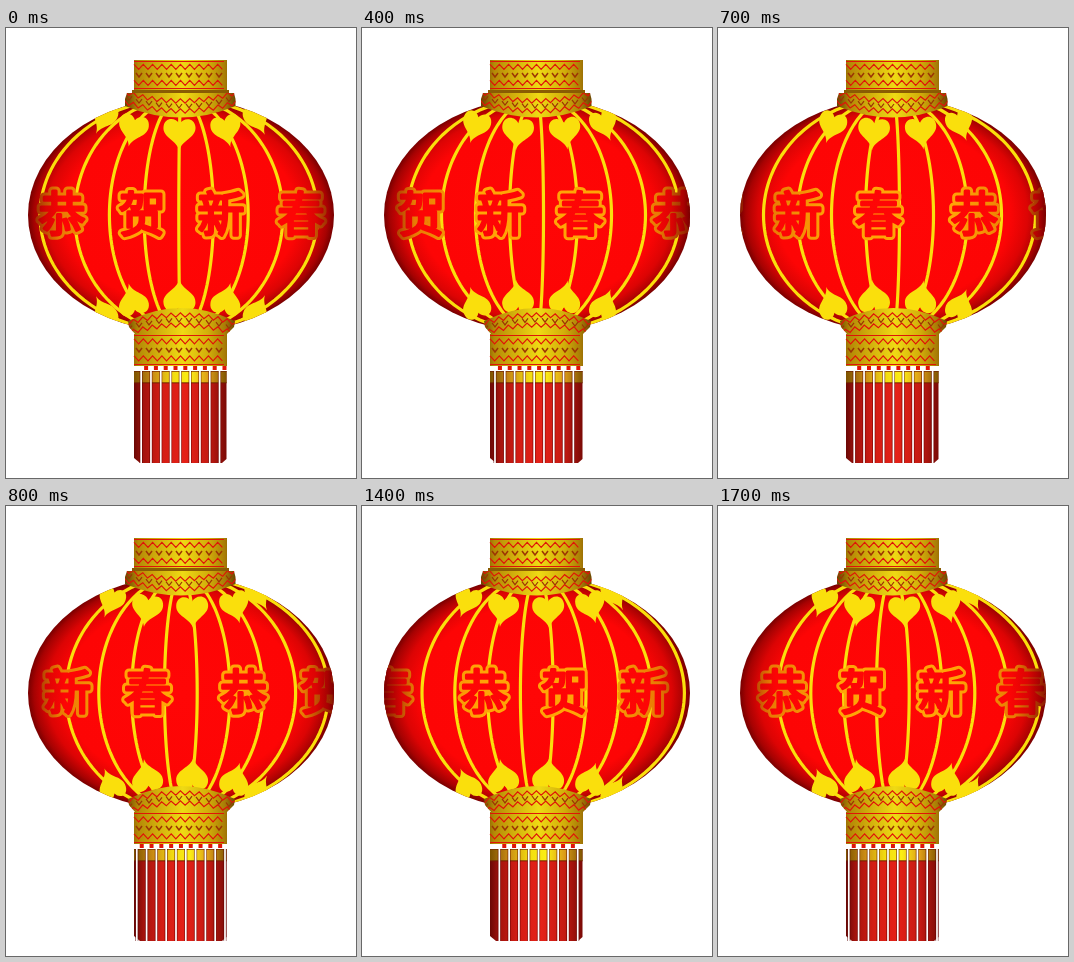
These frames come from a looping animation (350 by 450 pixels, 1.8 s). An HTML page with a canvas:

```html
<!DOCTYPE html>
<html lang="zh-CN">
<head>
<meta charset="utf-8">
<style>
html, body { margin: 0; width: 100%; height: 100%; overflow: hidden; background: #fff; }
canvas { display: block; }
</style>
</head>
<body>
<canvas id="stage" width="350" height="450"></canvas>
<script>
const ctx = document.getElementById('stage').getContext('2d');
const STEP_MS = 100, STEPS = 18;
const CX = 175, CY = 187, RX = 153, RY = 117;
const YELLOW = '#fadf0c', RED = '#e01408';

// Ribs repeat every three steps; every second rib carries hearts.
const RIB_PHASES = [
  { start: 34, gap: 34.7, parity: 0 },
  { start: 45.5, gap: 34, parity: 1 },
  { start: 60, gap: 32.8, parity: 0 }
];
const GLYPHS = [['恭', 0], ['贺', 80], ['新', 159], ['春', 239]];
const TEXT_PERIOD = 335;

function horizontal(x0, x1, stops) {
  const g = ctx.createLinearGradient(x0, 0, x1, 0);
  stops.forEach(([at, color]) => g.addColorStop(at, color));
  return g;
}

const gold = horizontal(119, 230, [[0, '#684400'], [0.12, '#b58a06'], [0.3, '#d2b00c'],
  [0.52, '#efda14'], [0.75, '#d2ae0a'], [0.9, '#a87c06'], [1, '#684400']]);
const tasselRed = horizontal(128, 221, [[0, '#6a0805'], [0.1, '#a3130d'], [0.3, '#d41d14'],
  [0.55, '#e52118'], [0.8, '#c41a12'], [1, '#780a06']]);
const tasselGold = horizontal(128, 221, [[0, '#7c5200'], [0.2, '#c98a14'], [0.42, '#f2dc10'],
  [0.6, '#fbee14'], [0.8, '#dc9c18'], [1, '#7c5200']]);
const glyphLine = horizontal(22, 328, [[0, '#8c1800'], [0.1, '#e87a04'], [0.3, '#ffa406'],
  [0.7, '#ffa406'], [0.9, '#e87a04'], [1, '#8c1800']]);
const shade = [[0, '#ff0606'], [0.76, '#fd0505'], [0.88, '#dc0404'], [0.96, '#a60202'], [1, '#780000']];
const glyphFill = horizontal(22, 328,
  [...shade.map(([at, c]) => [0.5 - at / 2, c]), ...shade.map(([at, c]) => [0.5 + at / 2, c])]);

const ribX = (u, y) => CX + u * RX * Math.sqrt(1 - ((y - CY) / RY) ** 2);

function drawBody() {
  ctx.save();
  ctx.translate(CX, CY);
  ctx.scale(RX, RY);
  const g = ctx.createRadialGradient(0, 0, 0, 0, 0, 1);
  shade.forEach(([at, color]) => g.addColorStop(at, color));
  ctx.fillStyle = g;
  ctx.beginPath();
  ctx.arc(0, 0, 1, 0, 7);
  ctx.fill();
  ctx.restore();
}

function drawHeart(u, flip) {
  const y = 104 - 18 * u * u;
  ctx.save();
  ctx.translate(0, CY);
  ctx.scale(1, flip);
  ctx.translate(ribX(u, y), y - CY);
  ctx.rotate(-u * 0.5);
  ctx.scale(1 - 0.3 * u * u, 1);
  ctx.beginPath();
  ctx.moveTo(0, 19);
  ctx.bezierCurveTo(-2, 8, -17, 6, -16, -5);
  ctx.bezierCurveTo(-15, -15, -4, -15, 0, -8);
  ctx.bezierCurveTo(4, -15, 15, -15, 16, -5);
  ctx.bezierCurveTo(17, 6, 2, 8, 0, 19);
  ctx.fill();
  ctx.restore();
}

function drawRibs(phase) {
  const { start, gap, parity } = RIB_PHASES[phase];
  ctx.strokeStyle = ctx.fillStyle = YELLOW;
  ctx.lineWidth = 3.2;
  for (let i = 0; i < 9; i++) {
    const u = (start + gap * i - CX) / RX;
    if (Math.abs(u) > 0.98) continue;
    ctx.beginPath();
    for (let y = 72; y <= 302; y += 5) ctx.lineTo(ribX(u, y), y);
    ctx.stroke();
    if (i % 2 === parity) {
      drawHeart(u, 1);
      drawHeart(u, -1);
    }
  }
}

function drawGreeting(step) {
  ctx.font = '500 47px "Noto Sans CJK SC", "Noto Sans CJK", sans-serif';
  ctx.textAlign = 'center';
  ctx.textBaseline = 'alphabetic';
  ctx.lineJoin = 'round';
  for (const [glyph, offset] of GLYPHS) {
    for (let turn = 0; turn < 3; turn++) {
      const x = 56 - 19.2 * step + offset + turn * TEXT_PERIOD;
      if (x < -20 || x > 370) continue;
      ctx.strokeStyle = glyphLine;
      ctx.lineWidth = 9;
      ctx.strokeText(glyph, x, 203);
      ctx.strokeStyle = ctx.fillStyle = glyphFill;
      ctx.lineWidth = 3;
      ctx.strokeText(glyph, x, 203);
      ctx.fillText(glyph, x, 203);
    }
  }
}

// Pattern rows follow a shallow bow across the given width.
function row(x0, x1, y, bow, wave, amp) {
  ctx.beginPath();
  for (let x = x0, i = 0; x <= x1; x += wave / 2, i++) {
    const n = (x - CX) / ((x1 - x0) / 2);
    ctx.lineTo(x, y + bow * (1 - n * n) + (i % 2 ? amp : -amp));
  }
  ctx.stroke();
}

function marks(x0, x1, y, bow) {
  for (let x = x0 + 5; x < x1; x += 10) {
    const n = (x - CX) / ((x1 - x0) / 2);
    const yy = y + bow * (1 - n * n);
    ctx.beginPath();
    ctx.moveTo(x - 3, yy - 2);
    ctx.lineTo(x, yy + 2);
    ctx.lineTo(x + 3, yy - 2);
    ctx.stroke();
  }
}

function drawBand(top, bottom) {
  ctx.fillStyle = gold;
  ctx.fillRect(128, top, 93, bottom - top);
  const h = bottom - top;
  ctx.strokeStyle = RED;
  ctx.lineWidth = 1.2;
  row(128, 221, top + 1.5, 0, 10, 0);
  row(128, 221, top + h * 0.23, 0, 9.3, 2.5);
  row(128, 221, top + h * 0.76, 0, 9.3, 2.5);
  row(128, 221, bottom - 1.5, 0, 10, 0);
  ctx.strokeStyle = '#9c3504';
  ctx.lineWidth = 1.5;
  marks(128, 221, top + h * 0.5, 0);
}

function drawRing(points, bowY, rowY, bow) {
  const [a, b, c, d, e, f] = points;
  ctx.beginPath();
  ctx.moveTo(...a);
  ctx.lineTo(...b);
  ctx.lineTo(...c);
  ctx.quadraticCurveTo(CX, bowY, ...d);
  ctx.lineTo(...e);
  ctx.lineTo(...f);
  ctx.closePath();
  ctx.fillStyle = gold;
  ctx.fill();
  ctx.save();
  ctx.clip();
  ctx.strokeStyle = RED;
  ctx.lineWidth = 1.2;
  row(118, 231, rowY - 5, bow, 9.4, 2.2);
  row(118, 231, rowY + 5, bow, 9.4, 2.2);
  ctx.strokeStyle = '#9c3504';
  marks(118, 231, rowY, bow);
  ctx.restore();
}

function drawTassels(step) {
  const gap = 9.8;
  const shift = (7.1 + gap * step * 4 / 9) % gap;

  ctx.beginPath();
  ctx.moveTo(128, 343);
  ctx.lineTo(220.5, 343);
  ctx.lineTo(220.5, 431);
  ctx.lineTo(216, 435);
  ctx.lineTo(134, 435);
  ctx.lineTo(128, 430);
  ctx.fillStyle = tasselRed;
  ctx.fill();
  ctx.fillStyle = tasselGold;
  ctx.fillRect(128, 343, 92.5, 12);
  ctx.fillStyle = 'rgba(110,30,0,.65)';
  ctx.fillRect(128, 343, 92.5, 1);
  ctx.fillRect(128, 354, 92.5, 1.5);

  for (let x = 128 + shift; x < 221; x += gap) {
    ctx.fillStyle = 'rgba(90,0,0,.6)';
    ctx.fillRect(x - 1.6, 343, 3.2, 92);
    ctx.fillStyle = '#fff';
    ctx.fillRect(x - 0.8, 342, 1.7, 94);
    ctx.fillStyle = RED;
    if (x + 7 < 221) ctx.fillRect(x + 3, 338, 4, 4);
  }
}

function draw(step) {
  ctx.fillStyle = '#fff';
  ctx.fillRect(0, 0, 350, 450);
  drawBody();
  ctx.save();
  ctx.beginPath();
  ctx.ellipse(CX, CY, RX, RY, 0, 0, 7);
  ctx.clip();
  drawRibs(step % 3);
  drawGreeting(step);
  ctx.restore();

  drawRing([[228, 65], [229.5, 71], [229.5, 78], [119, 78], [119, 71], [121, 65]], 101, 69, 9);
  drawBand(32, 62);
  ctx.fillStyle = '#8a5c02';
  ctx.fillRect(126, 62, 97, 3);
  drawRing([[221, 306], [228, 299], [229, 293], [122, 293], [123, 299], [129, 306]], 267, 301, -9);
  drawBand(306, 338);
  drawTassels(step);
}

function tick(now) {
  draw(Math.floor(now / STEP_MS) % STEPS);
  requestAnimationFrame(tick);
}
draw(0);
requestAnimationFrame(tick);
</script>
</body>
</html>
```
